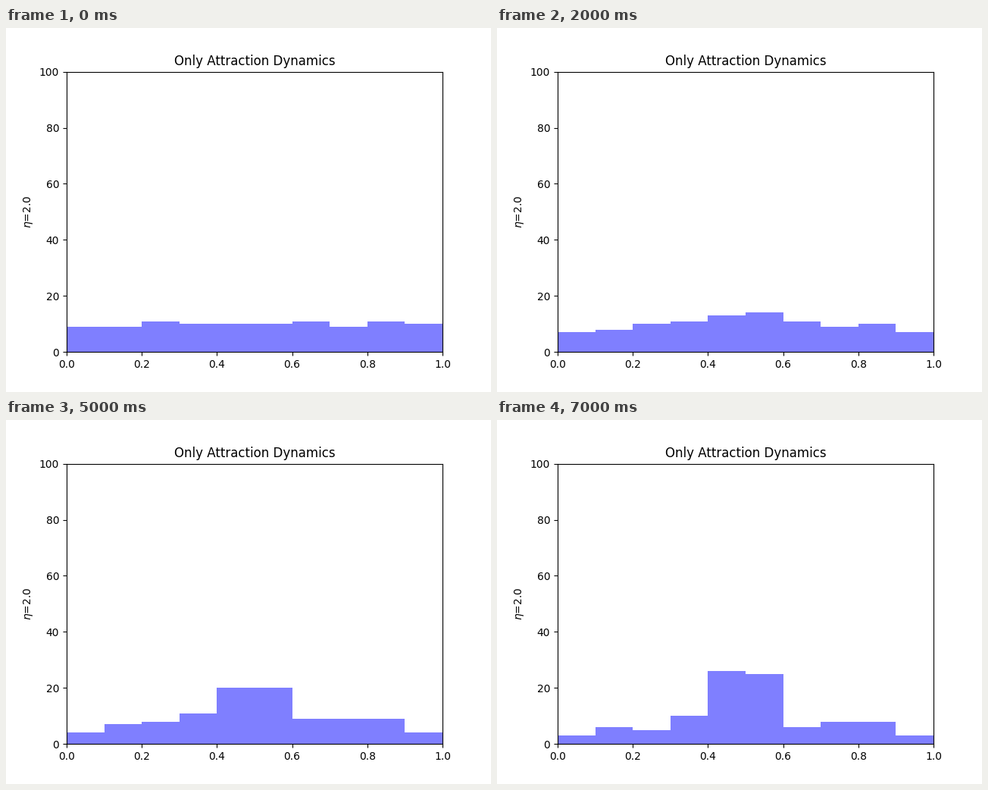
A matplotlib script that plays this animation: 640 px wide and 480 px high, repeating every 8000 ms.

```python
import matplotlib.pyplot as plt
import numpy as np
from matplotlib.animation import FuncAnimation

BINS = 10
STEPS = 8

# Spread at the start, on the way and at the end; each bin follows
# the parabola through its three values, rounded to whole agents.
KEY_STEPS = [0, 4, 7]
KEY_COUNTS = [
    [9, 9, 11, 10, 10, 10, 11, 9, 11, 10],
    [5, 7, 9, 11, 17, 18, 10, 9, 9, 5],
    [3, 6, 5, 10, 26, 25, 6, 8, 8, 3],
]
CURVES = np.polyfit(KEY_STEPS, KEY_COUNTS, 2)


def counts_at(step):
    return np.rint(np.polyval(CURVES, step))


fig, ax = plt.subplots(figsize=(6.4, 4.8), dpi=100)
ax.set_title("Only Attraction Dynamics")
ax.set_ylabel(r"$\eta$=2.0")
edges = np.linspace(0, 1, BINS + 1)
bars = ax.bar(edges[:-1], counts_at(0), width=np.diff(edges), align="edge",
              color="blue", alpha=0.5)
ax.set_xlim(0, 1)
ax.set_ylim(0, 100)


def update(step):
    for bar, count in zip(bars, counts_at(step)):
        bar.set_height(count)
    return list(bars)


anim = FuncAnimation(fig, update, frames=STEPS, interval=1000,
                     init_func=lambda: update(0), repeat=True, repeat_delay=0)
plt.show()
```
